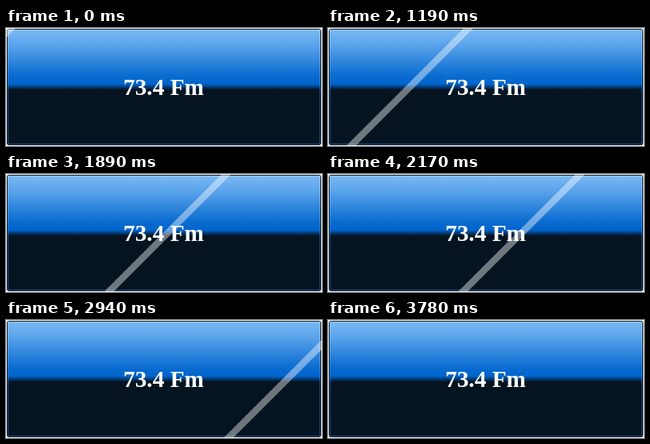
Recreate the animation shown at these times as an HTML page. Size 396 by 148 pixels, loop 4.78 s.

```html
<!DOCTYPE html>
<html lang="en">
<head>
<meta charset="utf-8">
<title>Radio button</title>
<style>
  html, body { margin: 0; width: 100%; height: 100%; overflow: hidden; background: #fff; }
  svg { display: block; }
  text { font: bold 29.33px "Liberation Serif", "Times New Roman", serif; fill: #fff; }
</style>
</head>
<body>
<svg width="396" height="148" viewBox="0 0 396 148">
  <defs>
    <linearGradient id="face" gradientUnits="userSpaceOnUse" x1="0" y1="2" x2="0" y2="146">
      <stop offset="0" stop-color="#7ab8f5"/>
      <stop offset="0.12" stop-color="#5ea6ec"/>
      <stop offset="0.4" stop-color="#0b6cd0"/>
      <stop offset="0.475" stop-color="#0064cc"/>
      <stop offset="0.525" stop-color="#051420"/>
      <stop offset="1" stop-color="#051420"/>
    </linearGradient>
    <linearGradient id="rim" gradientUnits="userSpaceOnUse" x1="0" y1="2" x2="0" y2="146">
      <stop offset="0" stop-color="#9ccbf8"/>
      <stop offset="0.48" stop-color="#1a74d4"/>
      <stop offset="0.56" stop-color="#0f4c8c"/>
      <stop offset="1" stop-color="#11508f"/>
    </linearGradient>
  </defs>
  <rect x="1.5" y="1.5" width="393" height="145" rx="2" fill="url(#face)" stroke="#04121f"/>
  <rect x="2.5" y="2.5" width="391" height="143" rx="1.5" fill="none" stroke="url(#rim)"/>
  <text x="147" y="84">73.4 Fm</text>
  <path id="glint" fill="#fff" fill-opacity="0.42"/>
</svg>
<script>
  const STEP = 70, LAST = 54, LOOP = 4780;
  const HEIGHT = 148, BAND = 12, STRIDE = 10;
  const glint = document.getElementById("glint");

  // The diagonal glint jumps one stride per step, then rests off stage.
  function draw(time) {
    const step = Math.min(LAST, Math.floor(time / STEP));
    const x = step * STRIDE + 0.5;
    glint.setAttribute("d", step < LAST
      ? `M${x} 0h${BAND}l${-HEIGHT} ${HEIGHT}h${-BAND}z` : "");
  }

  const start = performance.now();
  function tick() {
    draw((performance.now() - start) % LOOP);
    requestAnimationFrame(tick);
  }
  tick();
</script>
</body>
</html>
```
